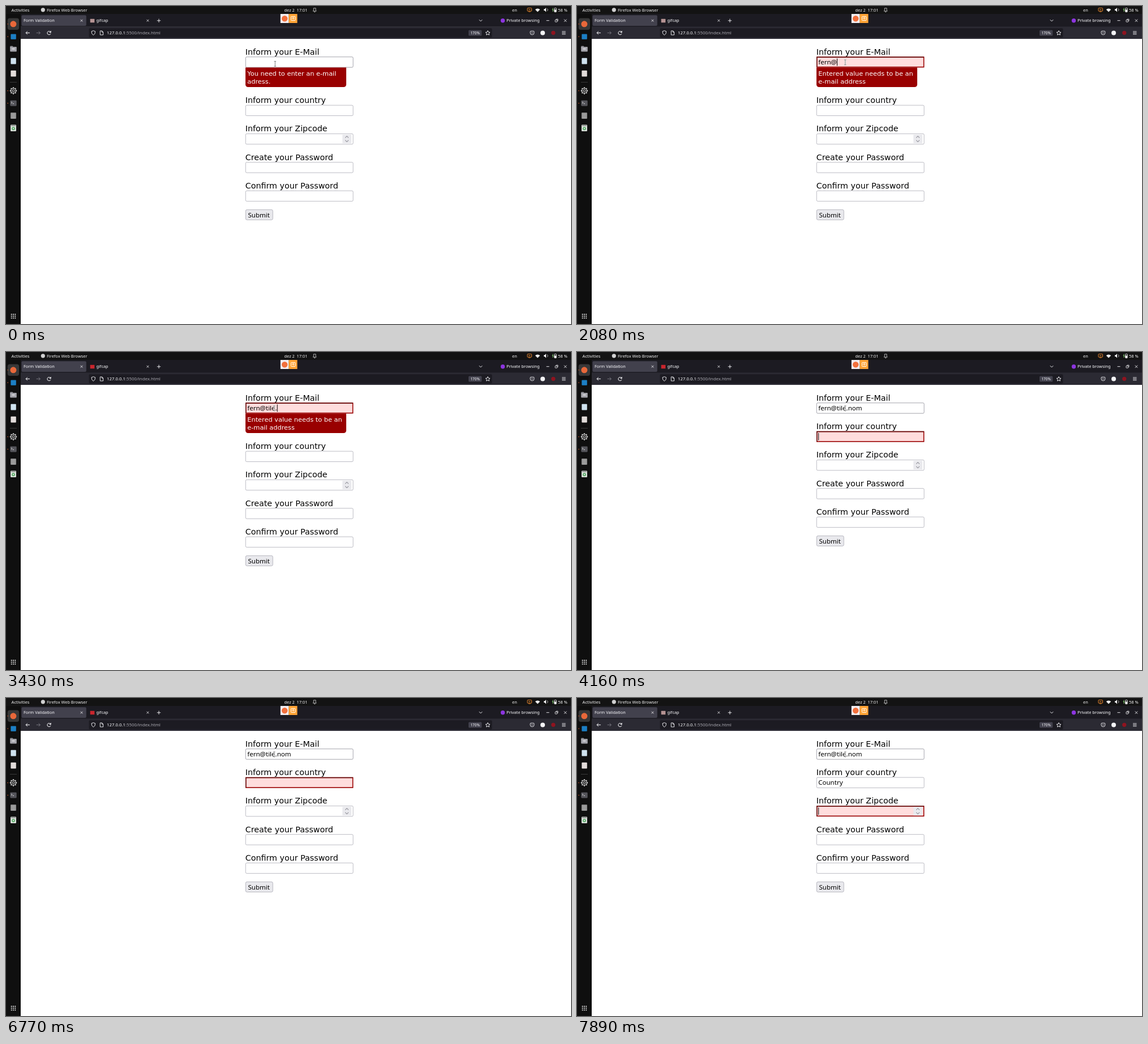
Write an HTML page with a canvas that moves like this. It is 998 px wide and 561 px high and loops after 8000 ms.

```html
<!DOCTYPE html>
<html lang="en">
<head>
<meta charset="utf-8">
<title>Form Validation</title>
<style>
html, body { margin: 0; width: 100%; height: 100%; overflow: hidden; background: #fff; }
canvas { display: block; width: 998px; height: 561px; }
</style>
</head>
<body>
<canvas id="stage"></canvas>
<script>
const W = 998, H = 561, LOOP = 8000;
const UI = '"Noto Sans", "Open Sans", sans-serif';
const PAGE = '"DejaVu Sans", sans-serif';
const canvas = document.getElementById('stage');
const ctx = canvas.getContext('2d');
const dpr = window.devicePixelRatio || 1;
canvas.width = W * dpr;
canvas.height = H * dpr;

// ---------- drawing helpers ----------
function rect(x, y, w, h, color) {
  ctx.fillStyle = color;
  ctx.fillRect(x, y, w, h);
}

function box(x, y, w, h, r, fill, stroke, lw = 1) {
  ctx.beginPath();
  ctx.roundRect(x, y, w, h, r);
  if (fill) { ctx.fillStyle = fill; ctx.fill(); }
  if (stroke) { ctx.strokeStyle = stroke; ctx.lineWidth = lw; ctx.stroke(); }
}

function disc(x, y, r, fill, stroke, lw = 1) {
  ctx.beginPath();
  ctx.arc(x, y, r, 0, Math.PI * 2);
  if (fill) { ctx.fillStyle = fill; ctx.fill(); }
  if (stroke) { ctx.strokeStyle = stroke; ctx.lineWidth = lw; ctx.stroke(); }
}

function line(color, lw, ...p) {
  ctx.beginPath();
  ctx.moveTo(p[0], p[1]);
  for (let i = 2; i < p.length; i += 2) ctx.lineTo(p[i], p[i + 1]);
  ctx.strokeStyle = color;
  ctx.lineWidth = lw;
  ctx.stroke();
}

function text(str, x, y, size, color = '#fbfbfe', font = UI) {
  ctx.font = `${size}px ${font}`;
  ctx.fillStyle = color;
  ctx.fillText(str, x, y);
}

function cross(x, y, r, color = '#fbfbfe') {
  line(color, 0.8, x - r, y - r, x + r, y + r);
  line(color, 0.8, x - r, y + r, x + r, y - r);
}

// ---------- timeline ----------
const EMAIL = 'fern@tile.nom', COUNTRY = 'Country';
const emailKeys = [[1300, 2], [1500, 3], [1690, 4], [2080, 5], [2330, 6], [2490, 7],
  [2800, 8], [3000, 9], [3430, 10], [3680, 11], [3750, 12], [3830, 13]];
const countryKeys = [[6850, 1], [6920, 2], [7170, 3], [7250, 4], [7340, 5], [7440, 6], [7560, 7]];
const focusAt = [[150, 0], [4160, 1], [4950, 0], [5620, 1], [7890, 2]];

function at(steps, t, start) {
  let v = start;
  for (const [time, value] of steps) if (t >= time) v = value;
  return v;
}

function emailError(n) {
  if (n === 0) return ['You need to enter an e-mail', 'adress.'];
  if (n < 6 || n === 10) return ['Entered value needs to be an', 'e-mail address'];
  if (n < 8) return ['Email should be at least 8', `characters; you entered ${n}.`];
  return [];
}

function countryError(n) {
  return n > 0 && n < 4
    ? ['Country name should be at', 'least 4 characters; you', `entered ${n}.`] : [];
}

// ---------- desktop and browser frame ----------
function topBar() {
  rect(0, 0, W, 14, '#131313');
  text('Activities', 9.5, 9.7, 7.7, '#f2f2f2');
  disc(65.3, 6.8, 3.6, '#d0d0d0');
  text('Firefox Web Browser', 72, 9.7, 7.4, '#f2f2f2');
  text('dez 2  17:01', 491.5, 9.7, 7.4, '#f2f2f2');
  line('#ddd', 0.8, 542.2, 9, 543.3, 7.5, 543.3, 3.8, 547.1, 3.8, 547.1, 7.5, 548.2, 9, 542.2, 9);
  line('#ddd', 1, 544.2, 10.4, 546.2, 10.4);
  text('en', 894, 9.7, 7.4, '#f2f2f2');
  box(921, 3.6, 7.5, 5.5, 0.8, null, '#e8862e', 1);
  line('#e8862e', 1, 923, 6.5, 926.5, 6.5);
  rect(923, 9.5, 3.5, 1, '#e8862e');
  ctx.beginPath();
  ctx.moveTo(939, 10.5);
  ctx.arc(939, 10.5, 6, -Math.PI * 0.75, -Math.PI * 0.25);
  ctx.fillStyle = '#f2f2f2';
  ctx.fill();
  ctx.beginPath();
  ctx.moveTo(950, 5.5);
  [[951.5, 5.5], [954, 3], [954, 10.5], [951.5, 8], [950, 8]].forEach(p => ctx.lineTo(...p));
  ctx.fill();
  ctx.beginPath();
  ctx.arc(954, 6.8, 3, -0.9, 0.9);
  ctx.strokeStyle = '#ddd';
  ctx.lineWidth = 0.8;
  ctx.stroke();
  line('#7bc66b', 1, 966.3, 3.5, 965, 7, 967, 6.5, 965.8, 10);
  box(968.6, 3.6, 3.6, 7, 0.6, null, '#f2f2f2', 0.9);
  rect(969, 6.2, 2.8, 4.2, '#f2f2f2');
  text('58 %', 975, 9.7, 7.5, '#f2f2f2');
}

function dock() {
  rect(0, 14, 26, H - 14, '#0f0f0f');
  box(2.7, 21.5, 20.4, 20.4, 4, '#383838');
  disc(12.9, 31.8, 5.5, '#e8683a');
  box(8.4, 49.4, 9.4, 9.4, 1, '#1c7fc4');
  [31.8, 54, 149.5, 171.5].forEach(y => disc(3.2, y, 0.8, '#d9602e'));

  box(7.2, 70.6, 5, 4, 1, '#83838a');
  box(7.2, 72, 11.6, 8.6, 1, '#a5a5ac');
  rect(10.5, 75, 5, 1.4, '#ededf0');

  box(8.4, 91.8, 9.4, 10.8, 1, '#cfe2ef');
  box(8.4, 113.8, 9.4, 10.8, 1, '#e2dcda');
  rect(7, 134.2, 12, 0.8, '#444');

  for (let i = 0; i < 8; i++) {
    const a = i * Math.PI / 4, c = Math.cos(a), s = Math.sin(a);
    line('#ddd', 1.8, 13 + c * 4.5, 149.5 + s * 4.5, 13 + c * 6.2, 149.5 + s * 6.2);
  }
  disc(13, 149.5, 4.5, '#222', '#ddd', 1.2);
  disc(13, 149.5, 2, null, '#ddd', 0.9);

  box(7.3, 166.6, 11.4, 9.8, 1.3, '#54545a');
  line('#eee', 0.9, 9.2, 169, 11, 170.5, 9.2, 172);
  line('#eee', 0.9, 11.8, 172.2, 14, 172.2);

  box(8, 188, 10, 11, 1.2, '#8b8b8b');
  [191, 194, 197].forEach(y => line('#c8c8c8', 0.8, 9.7, y, 16.3, y));

  box(8, 209.5, 10, 11.5, 1.2, '#d8ddd8');
  rect(9, 210.5, 8, 1.2, '#777');
  disc(13, 216.2, 2.1, null, '#37a24b', 1.3);

  for (let i = 0; i < 9; i++) {
    rect(8.8 + (i % 3) * 3.3, 543 + Math.floor(i / 3) * 3.3, 1.8, 1.8, '#ededed');
  }
}

function browser(dim) {
  rect(26, 14, W - 26, 22.5, '#1c1b22');
  rect(26, 36.5, W - 26, 21.5, '#2b2a33');
  box(27.5, 16.3, 114.3, 18.6, 2, '#42414d');
  text('Form Validation', 31, 28.4, 7.4);
  cross(133.5, 25.7, 1.9);
  box(148.7, 22.8, 7.6, 6.4, 0.5, dim ? '#b59393' : '#c9252d');
  text('gifcap', 159.5, 28.4, 7.3);
  cross(250.4, 25.7, 1.9);
  line('#fbfbfe', 0.9, 266.8, 25.8, 273.2, 25.8);
  line('#fbfbfe', 0.9, 270, 22.6, 270, 29);

  box(484.8, 14, 14.8, 16, 0, '#f3eef2');
  disc(492.2, 22.2, 5.2, '#f2703d');
  rect(499.5, 14, 15, 16, '#ffa436');
  box(503.5, 18.5, 7.5, 7, 0.8, null, '#fff', 1);
  line('#fff', 1, 505.3, 21.8, 507.2, 20.2, 509.2, 21.8);
  line('#fff', 1, 507.2, 20.2, 507.2, 24);

  line('#fbfbfe', 0.9, 835.8, 24.2, 838.5, 27, 841.2, 24.2);
  disc(877.5, 25.7, 3.7, '#8d35e0');
  text('Private browsing', 884, 28.4, 7.45);
  line('#fbfbfe', 0.9, 954.5, 25.7, 959.5, 25.7);
  box(970, 24.5, 3.6, 3.6, 0.4, null, '#fbfbfe', 0.8);
  line('#fbfbfe', 0.8, 971.3, 23.2, 974.9, 23.2, 974.9, 26.8);
  cross(988, 25.7, 2.3);

  const arrow = (x, dir, color) => {
    line(color, 1, x - 3.4, 47.4, x + 3.4, 47.4);
    line(color, 1, x + dir * 0.6, 44.6, x + dir * 3.4, 47.4, x + dir * 0.6, 50.2);
  };
  arrow(38.5, -1, '#fbfbfe');
  arrow(57, 1, '#74737c');
  ctx.beginPath();
  ctx.arc(76, 47.6, 3.1, 0.3, Math.PI * 1.75);
  ctx.strokeStyle = '#fbfbfe';
  ctx.lineWidth = 1;
  ctx.stroke();
  ctx.beginPath();
  ctx.moveTo(79.6, 43.6);
  ctx.lineTo(79.6, 47);
  ctx.lineTo(76.2, 47);
  ctx.fillStyle = '#fbfbfe';
  ctx.fill();

  box(146.5, 39.2, 712, 16.4, 2, '#1c1b22');
  ctx.beginPath();
  ctx.moveTo(154.3, 43.6);
  ctx.lineTo(157.6, 44.8);
  ctx.quadraticCurveTo(157.8, 49.5, 154.3, 51.4);
  ctx.quadraticCurveTo(150.8, 49.5, 151, 44.8);
  ctx.closePath();
  ctx.strokeStyle = '#fbfbfe';
  ctx.lineWidth = 0.9;
  ctx.stroke();
  line('#fbfbfe', 0.9, 166.3, 43.9, 169.6, 43.9, 171.6, 46, 171.6, 51, 166.3, 51, 166.3, 43.9);
  line('#fbfbfe', 0.8, 169.4, 44, 169.4, 46.2, 171.6, 46.2);
  const host = '127.0.0.1';
  text(host, 178, 50.3, 7.8);
  const hostW = ctx.measureText(host).width;
  text(':5500/index.html', 178 + hostW, 50.3, 7.8, '#a9a8b0');
  box(817, 42.4, 23.3, 10.2, 1.5, '#42414d');
  text('170%', 820.4, 49.8, 6.5);

  ctx.beginPath();
  for (let i = 0; i < 10; i++) {
    const a = -Math.PI / 2 + i * Math.PI / 5, r = i % 2 ? 2 : 4.2;
    ctx.lineTo(851 + Math.cos(a) * r, 47.7 + Math.sin(a) * r);
  }
  ctx.closePath();
  ctx.strokeStyle = '#fbfbfe';
  ctx.lineWidth = 0.9;
  ctx.stroke();

  box(926, 44.3, 6.8, 6.4, [1, 1, 3.2, 3.2], null, '#fbfbfe', 0.9);
  line('#fbfbfe', 0.9, 927.7, 46.5, 929.4, 48.2, 931.1, 46.5);
  disc(948, 47.5, 4, '#f4f4f6');
  disc(966.7, 47.3, 3.6, '#8f1420');
  [45, 47.4, 49.8].forEach(y => line('#fbfbfe', 0.9, 982, y, 988.5, y));
}

// ---------- form ----------
const LEFT = 423, FIELD_W = 190.4, FIELD_H = 19, INK = '#000', EDGE = 0.6;
const labels = ['Inform your E-Mail', 'Inform your country', 'Inform your Zipcode',
  'Create your Password', 'Confirm your Password'];

function field(y, o) {
  if (o.bad) {
    const b = 1.6, r = LEFT + FIELD_W, bottom = y + FIELD_H;
    rect(LEFT, y, FIELD_W, FIELD_H, '#900');
    ctx.beginPath();
    ctx.moveTo(LEFT, bottom);
    [[LEFT, y], [r, y], [r - b, y + b], [LEFT + b, y + b], [LEFT + b, bottom - b]]
      .forEach(p => ctx.lineTo(...p));
    ctx.fillStyle = '#5c0000';
    ctx.fill();
    rect(LEFT + b, y + b, FIELD_W - 2 * b, FIELD_H - 2 * b, '#fdd');
  } else {
    const edge = o.hover ? '#676774' : '#8f8f9d', h = EDGE / 2;
    box(LEFT + h, y + h, FIELD_W - EDGE, FIELD_H - EDGE, 2, '#fff', edge, EDGE);
    if (o.focus) box(LEFT - 0.6, y - 0.6, FIELD_W + 1.2, FIELD_H + 1.2, 2.5, null, '#e95420', 1.9);
  }
  if (o.spin) {
    rect(594.3, y + 1.9, 15.8, FIELD_H - 3.8, '#e9e9ed');
    const m = y + FIELD_H / 2;
    line('#5b5b66', 0.9, 599.2, m - 2.2, 602.1, m - 5, 605, m - 2.2);
    line('#5b5b66', 0.9, 599.2, m + 2.2, 602.1, m + 5, 605, m + 2.2);
  }
  const value = o.value || '';
  text(value, LEFT + 3.2, y + 13.6, 11.55, INK);
  if (o.focus && o.caret) {
    rect(LEFT + 3.2 + ctx.measureText(value).width, y + 3, 1, 13, INK);
  }
}

function errorBox(y, lines) {
  if (!lines.length) return 0;
  const h = 7 + 14 * lines.length;
  box(LEFT, y, 178, h - 0.4, [0, 0, 4.5, 4.5], '#900');
  lines.forEach((s, i) => text(s, LEFT + 3.3, y + 14.1 + 14 * i, 11.35, '#fff', PAGE));
  return h;
}

function form(t) {
  rect(26, 58, W - 26, H - 58, '#fff');
  const nEmail = at(emailKeys, t, 0), nCountry = at(countryKeys, t, 0);
  const focus = at(focusAt, t, -1);
  const errors = [emailError(nEmail), countryError(nCountry)];
  const values = [EMAIL.slice(0, nEmail), COUNTRY.slice(0, nCountry)];
  const bad = [errors[0].length > 0, nCountry < 4, true];
  const caret = !(t >= 6770 && t < 6850);
  let y = 89.5;
  labels.forEach((label, i) => {
    text(label, LEFT - 0.3, y - 3.9, 14.28, INK, PAGE);
    field(y, {
      focus: focus === i, bad: focus === i && bad[i], hover: i === 0,
      value: values[i], spin: i === 2, caret
    });
    y += 50.3 + errorBox(y + FIELD_H, errors[i] || []);
  });
  const top = y - 17;
  box(LEFT + EDGE / 2, top + EDGE / 2, 48.6 - EDGE, 18.6 - EDGE, 2.5, '#e9e9ed', '#8f8f9d', EDGE);
  text('Submit', LEFT + 4.5, top + 13.5, 11.5, INK);
}

function pointer(t) {
  const k = Math.min(1, Math.max(0, (t - 80) / 220));
  const x = 475.3 - 1.5 * k, y = 102 - 2.6 * k;
  const beam = (color, lw) => {
    line(color, lw, x, y - 4, x, y + 4);
    line(color, lw, x - 1.8, y - 4.4, x + 1.8, y - 4.4);
    line(color, lw, x - 1.8, y + 4.4, x + 1.8, y + 4.4);
  };
  beam('rgba(255,255,255,.8)', 2.2);
  beam('#707070', 0.9);
}

function draw(t) {
  ctx.setTransform(dpr, 0, 0, dpr, 0, 0);
  const pulse = Math.floor((t - 300 + 1385) / 1385);
  form(t);
  topBar();
  dock();
  browser(pulse % 2 === 0);
  pointer(t);
}

const start = performance.now();
function tick() {
  draw((performance.now() - start) % LOOP);
  requestAnimationFrame(tick);
}
tick();
</script>
</body>
</html>
```
